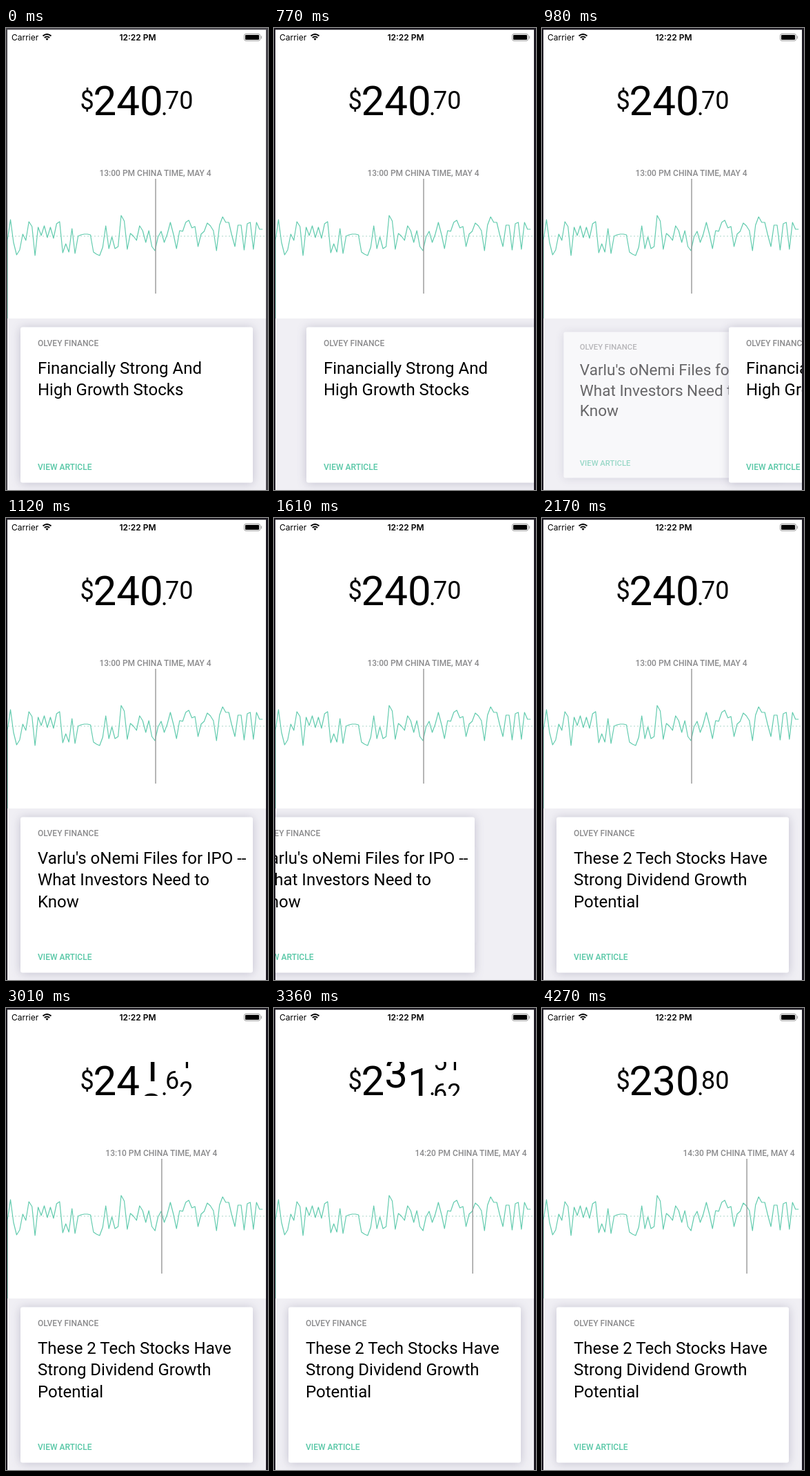
These frames come from a looping animation (380x668 px, 5.04 s). An HTML page:

```html
<!DOCTYPE html>
<html lang="en">
<head>
<meta charset="utf-8">
<title>Stock price and news cards</title>
<style>
  html, body { margin: 0; width: 100%; height: 100%; overflow: hidden; background: #fff; }
  svg { display: block; width: 380px; height: 668px; font-family: Roboto, sans-serif; }
  .status { font: 12px Inter, sans-serif; }
  .small { font-size: 12px; font-weight: 500; fill: #8b8b8d; }
  .title { font-size: 24px; }
  .link { fill: #57c7a6; }
  .mid { text-anchor: middle; }
  .card rect { fill: #fff; filter: drop-shadow(0 1px 7px rgba(50, 45, 90, .24)); }
</style>
</head>
<body>
<svg viewBox="0 0 380 668">
  <clipPath id="window"><rect x="100" y="78" width="180" height="49"/></clipPath>
  <rect width="380" height="668" fill="#fff"/>

  <g class="status">
    <text x="8" y="17.5">Carrier</text>
    <text x="191" y="17.5" class="mid" font-weight="600">12:22 PM</text>
  </g>
  <g fill="none" stroke="#000" stroke-width="2">
    <path d="M53.5 11.5Q59.5 6.5 65.5 11.5M55.8 14Q59.5 11 63.2 14"/>
    <path d="M57.5 15.5Q59.5 14 61.5 15.5L59.5 18Z" fill="#000" stroke="none"/>
    <rect x="345.5" y="8.5" width="23" height="10" rx="2.5" stroke="#999" stroke-width="1"/>
    <rect x="347" y="10" width="20" height="7" rx="1" fill="#000" stroke="none"/>
    <path d="M370.5 11.5v4" stroke="#999" stroke-width="1.2"/>
  </g>

  <text x="117.5" y="117" class="mid" font-size="36">$</text>
  <text x="225" y="126" font-size="36">.</text>
  <g id="price" class="mid" clip-path="url(#window)"></g>

  <path d="M3 301H375" stroke="#a9d8ca" stroke-width="1.2" stroke-dasharray="2 3"/>
  <path id="chart" fill="none" stroke="#62cbae" stroke-width="1.2" stroke-linejoin="round"/>
  <path id="cursor" d="M0 218V384" stroke="#979797" stroke-width="1.4"/>
  <text id="label" y="214" class="small mid"></text>

  <rect y="420" width="380" height="248" fill="#f0eff4"/>
  <g id="cards"></g>
  <path id="bezel" d="M0 0H380V668H377V2.5H2V668H0Z"/>
</svg>
<script>
const LOOP = 5040, STEP = 70, CENTER_X = 190, CENTER_Y = 545;
const $ = id => document.getElementById(id);

function add(parent, name, attrs, text = '') {
  const el = document.createElementNS('http://www.w3.org/2000/svg', name);
  for (const key in attrs) el.setAttribute(key, attrs[key]);
  el.textContent = text;
  return parent.appendChild(el);
}

// Linear interpolation through [time, value] keys.
function track(t, keys) {
  if (t <= keys[0][0]) return keys[0][1];
  for (let i = 1; i < keys.length; i++) {
    const [t0, a] = keys[i - 1], [t1, b] = keys[i];
    if (t < t1) return a + (b - a) * (t - t0) / (t1 - t0);
  }
  return keys[keys.length - 1][1];
}

const levels = [
  307, 277, 310, 328, 321, 298, 307, 280, 287, 329, 288, 300, 286, 303, 288, 304, 283, 280, 325, 312, 324,
  290, 326, 301, 299, 298, 298, 299, 324, 327, 329, 317, 286, 319, 302, 319, 316, 271, 279, 320, 297, 301,
  307, 286, 293, 310, 293, 316, 322, 302, 294, 310, 298, 281, 298, 319, 293, 294, 281, 278, 289, 287, 316,
  298, 294, 282, 286, 293, 322, 285, 273, 281, 281, 300, 316, 285, 285, 321, 283, 281, 320, 281, 291, 291];
$('chart').setAttribute('d', 'M2 420' + levels.map((y, i) => `L${(2 + i * 4.46).toFixed(1)} ${y}`).join(''));

const columns = [
  { x: 143.4, big: true, keys: [[0, 2]] },
  { x: 177.1, big: true, keys: [[3010, 4], [3220, 3.7], [3360, 3.18], [3500, 3]] },
  { x: 210.8, big: true, keys: [[2940, 0], [3150, 4], [3360, .95], [3500, .15], [3640, 0]] },
  { x: 241.2, keys: [[2940, 7], [3150, 4], [3360, 5.6], [3500, 7.7], [3640, 8]] },
  { x: 261.4, keys: [[2940, 0], [3150, 5], [3360, 1.6], [3500, .3], [3640, 0]] }
];
for (const col of columns) {
  col.pitch = col.big ? 60 : 45;
  col.el = add($('price'), 'g', { 'font-size': col.big ? 60 : 36 });
  for (let d = 0; d < 10; d++)
    add(col.el, 'text', { x: col.x, y: (col.big ? 126 : 117) + d * col.pitch }, d);
}

const headlines = [
  ['Financially Strong And', 'High Growth Stocks'],
  ["Varlu's oNemi Files for IPO --", 'What Investors Need to', 'Know'],
  ['These 2 Tech Stocks Have', 'Strong Dividend Growth', 'Potential']
];
const cards = headlines.map(lines => {
  const card = add($('cards'), 'g', { class: 'card' });
  $('cards').prepend(card);
  add(card, 'rect', { x: 21, y: 432.5, width: 337, height: 225, rx: 3 });
  add(card, 'text', { x: 46, y: 460, class: 'small' }, 'OLVEY FINANCE');
  lines.forEach((line, i) => add(card, 'text', { x: 46, y: 499.5 + i * 31.5, class: 'title' }, line));
  add(card, 'text', { x: 46, y: 639, class: 'small link' }, 'VIEW ARTICLE');
  return card;
});

function drawCards(t) {
  const top = t < 1120 ? 0 : t < 1960 ? 1 : 2;
  const dx = [
    track(t, [[700, 0], [770, 26], [980, 250], [1120, 400]]),
    track(t, [[1540, 0], [1610, -67], [1820, -290], [1960, -400]]),
    0
  ][top];
  const p = Math.min(1, Math.abs(dx) / 285), scale = .5 + .5 * p;
  cards.forEach((card, i) => {
    const next = i === top + 1;
    card.style.display = i === top || next && dx ? '' : 'none';
    card.setAttribute('opacity', next ? .1 + .9 * p ** 5 : 1);
    card.setAttribute('transform', next
      ? `translate(${CENTER_X} ${CENTER_Y}) scale(${scale}) translate(${-CENTER_X} ${-CENTER_Y})`
      : `translate(${dx} 0)`);
  });
}

function drawPrice(t) {
  const ticks = Math.round(track(t, [[2940, 0], [3360, 8], [3430, 9]]));
  const x = 217 + ticks * 8.9, minutes = 780 + ticks * 10;
  $('cursor').setAttribute('transform', `translate(${x} 0)`);
  $('label').setAttribute('x', Math.min(x - .5, 285.5));
  $('label').textContent =
    `${Math.floor(minutes / 60)}:${String(minutes % 60).padStart(2, '0')} PM CHINA TIME, MAY 4`;
  for (const { el, pitch, keys } of columns)
    el.setAttribute('transform', `translate(0 ${-track(t, keys) * pitch})`);
}

function draw() {
  const t = Math.floor(performance.now() % LOOP / STEP) * STEP;
  drawCards(t);
  drawPrice(t);
  $('bezel').setAttribute('fill', t < 770 ? '#48464c' : '#1b1820');
  requestAnimationFrame(draw);
}
draw();
</script>
</body>
</html>
```
